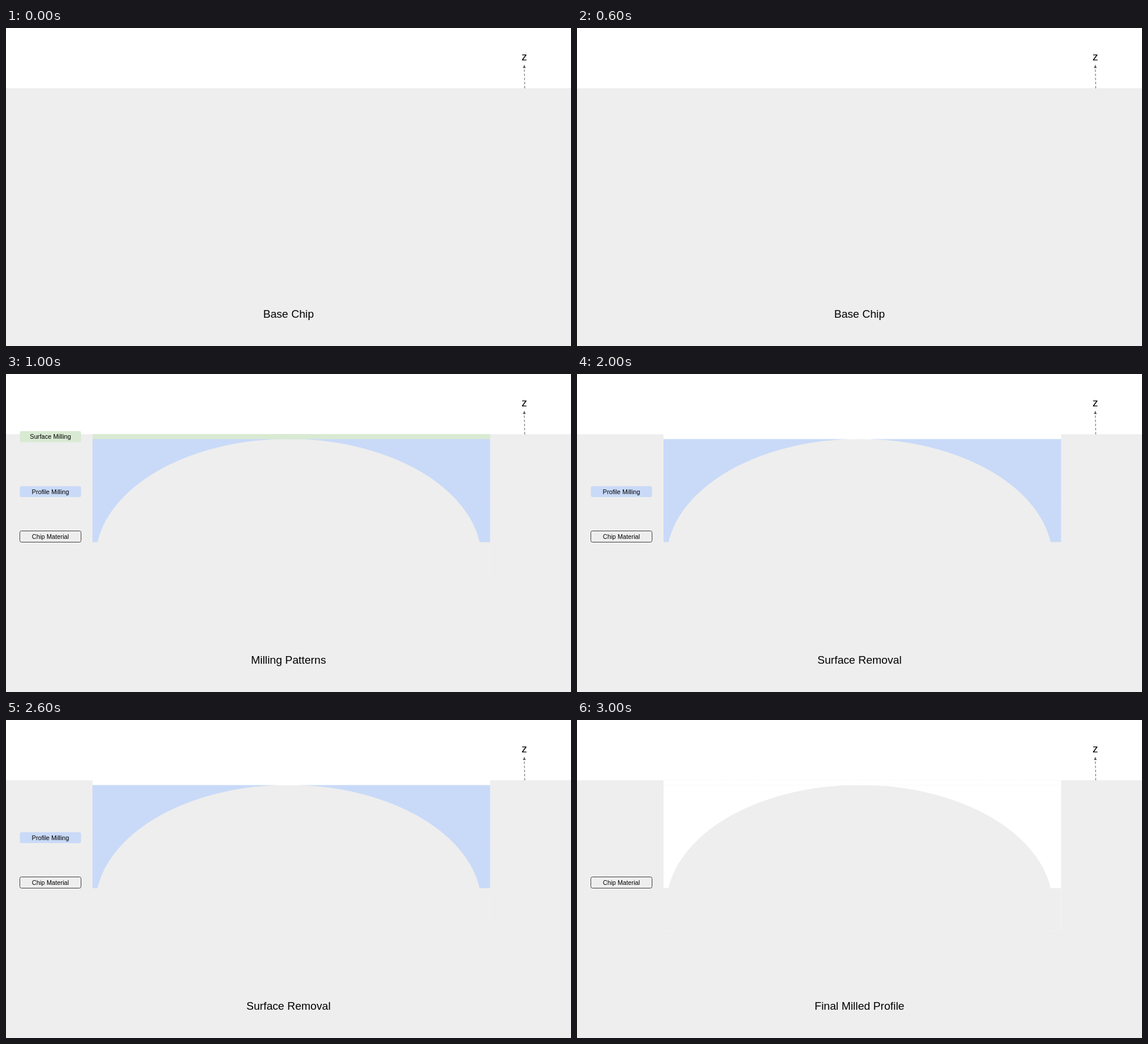
Write an HTML page that moves like this. It is 960x540 px and loops after 4 s.

```html
<!DOCTYPE html>
<html lang="en">
<head>
<meta charset="utf-8">
<title>Chip milling</title>
<style>
  html, body { margin: 0; width: 100%; height: 100%; overflow: hidden; background: #fff; }
  svg { display: block; width: 960px; height: 540px; }
  text { font: 18.667px "Liberation Sans", Arial, sans-serif; text-anchor: middle; }
  .label text { font-size: 10.667px; }
</style>
</head>
<body>
<svg viewBox="0 0 960 540">
  <rect y="102.3" width="960" height="437.7" fill="#eee"/>

  <g data-steps="123">
    <rect id="surface" x="147" y="102" width="675.5" height="9"/>
    <path id="profile" d="M147 110.5H822.5V285.5H804.7A328 204.5 0 0 0 155.5 285.5H147Z"/>
    <path d="M822.5 286V352" stroke="#f1f1f1"/>
  </g>
  <g data-steps="3" fill="none" stroke="#f2f2f2">
    <path d="M147 102.5H822M147 110.5H440M520 110.5H822" stroke="#f7f7f7" stroke-dasharray="2 1"/>
    <path d="M822.5 286V357.5H800M147 357.5H162"/>
  </g>

  <g class="label" data-steps="1">
    <rect x="23.5" y="97" width="104" height="18.7" rx="3" fill="#d9ead3"/>
    <text x="75.5" y="110">Surface Milling</text>
  </g>
  <g class="label" data-steps="12">
    <rect x="23.5" y="190.4" width="104" height="18.7" rx="3" fill="#c9daf8"/>
    <text x="75.5" y="203.6">Profile Milling</text>
  </g>
  <g class="label" data-steps="123">
    <rect x="23.5" y="266.5" width="104" height="19" rx="3" fill="none" stroke="#434343"/>
    <text x="75.5" y="279.7">Chip Material</text>
  </g>

  <text x="880.7" y="55">z</text>
  <path d="M881.4 102.5L880.7 67" stroke="#595959" stroke-dasharray="4 3"/>
  <path d="M878.4 68L880.6 62.3L883 68Z" fill="#595959"/>
  <text id="title" x="480" y="492">Base Chip</text>
</svg>
<script>
  const titles = ["Base Chip", "Milling Patterns", "Surface Removal", "Final Milled Profile"];
  const groups = document.querySelectorAll("[data-steps]");
  const byId = id => document.getElementById(id);
  let shown = -1;

  function show(step) {
    for (const g of groups)
      g.style.display = g.dataset.steps.includes(step) ? "" : "none";
    byId("surface").style.fill = step === 1 ? "#d9ead3" : "#fff";
    byId("profile").style.fill = step === 3 ? "#fff" : "#c9daf8";
    byId("title").textContent = titles[step];
    shown = step;
  }

  function tick() {
    const step = Math.floor(performance.now() / 1000) % titles.length;
    if (step !== shown) show(step);
    requestAnimationFrame(tick);
  }
  tick();
</script>
</body>
</html>
```
